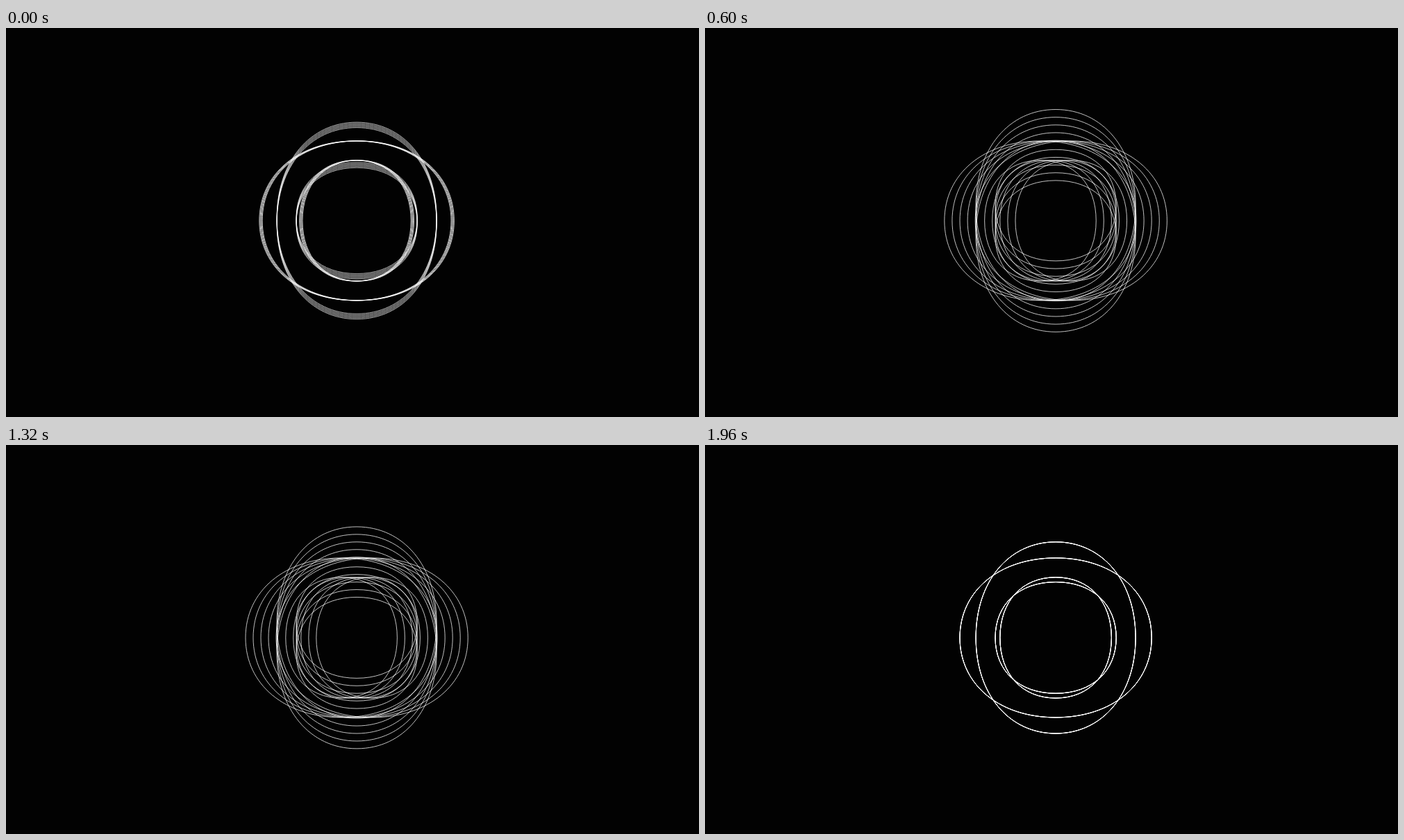
Animation, 998 px wide and 561 px high, one loop 2520 ms. Source, as an HTML page with a canvas:

```html
<!DOCTYPE html>
<html lang="en">
<head>
<meta charset="utf-8">
<title>Sliding rings</title>
<style>
  html, body { margin: 0; width: 100%; height: 100%; overflow: hidden; background: #020202; }
  canvas { display: block; }
</style>
</head>
<body>
<canvas id="stage" width="998" height="561"></canvas>
<script>
const LOOP = 2520, STEP = 40;
const EASE_TIME = 1000;   // ms to open, and again to close
const CLOSED_AT = 1960;
const OPEN_LEAD = 28;     // ms of opening that happen before the loop point
const TALL_LEAD = 20;     // the tall ring runs slightly ahead
const MAX_GAP = 11.6;     // widest distance between neighbouring copies
const SIDE_COPIES = 2;

const ctx = document.getElementById('stage').getContext('2d');

// Easing curve with handles (x1, y1) and (x2, 1)
function bezierEase(x1, y1, x2) {
  const curve = (a, b, s) =>
    3 * a * s * (1 - s) ** 2 + 3 * b * s * s * (1 - s) + s ** 3;
  return x => {
    if (x <= 0) return 0;
    if (x >= 1) return 1;
    let low = 0, high = 1;
    for (let i = 0; i < 30; i++) {
      const mid = (low + high) / 2;
      if (curve(x1, x2, mid) < x) low = mid; else high = mid;
    }
    return curve(y1, 1, low);
  };
}

const opening = bezierEase(0.17, 0.55, 0.2);
const closing = bezierEase(0.2, 0.44, 0.2);

function gapAt(t, lead) {
  if (t >= CLOSED_AT) return 0;
  const open = opening((t + lead + OPEN_LEAD) / EASE_TIME);
  const close = closing((CLOSED_AT - t - lead) / EASE_TIME);
  return MAX_GAP * Math.min(open, close);
}

// A slightly squared oval; round is the handle length relative to the radius
function addOval(path, rx, ry, round) {
  const hx = rx * round, hy = ry * round;
  path.moveTo(0, -ry);
  path.bezierCurveTo(hx, -ry, rx, -hy, rx, 0);
  path.bezierCurveTo(rx, hy, hx, ry, 0, ry);
  path.bezierCurveTo(-hx, ry, -rx, hy, -rx, 0);
  path.bezierCurveTo(-rx, -hy, -hx, -ry, 0, -ry);
  path.closePath();
}

const ring = new Path2D();
addOval(ring, 138.1, 115, 0.588);
addOval(ring, 80.3, 87.1, 0.604);

// Copies of the ring, spaced evenly along its long axis
function drawRings(gap, angle) {
  ctx.save();
  ctx.translate(505.1, 277.9);
  ctx.rotate(angle);
  ctx.translate(-SIDE_COPIES * gap, 0);
  for (let i = 0; i <= 2 * SIDE_COPIES; i++) {
    ctx.stroke(ring);
    ctx.translate(gap, 0);
  }
  ctx.restore();
}

function render(t) {
  ctx.fillStyle = '#020202';
  ctx.fillRect(0, 0, 998, 561);
  ctx.strokeStyle = '#fff';
  ctx.lineWidth = 0.75;
  drawRings(gapAt(t, 0), 0);
  drawRings(gapAt(t, TALL_LEAD), Math.PI / 2);
}

const start = performance.now();
function tick() {
  const t = (performance.now() - start) % LOOP;
  render(Math.floor(t / STEP) * STEP);
  requestAnimationFrame(tick);
}
tick();
</script>
</body>
</html>
```
